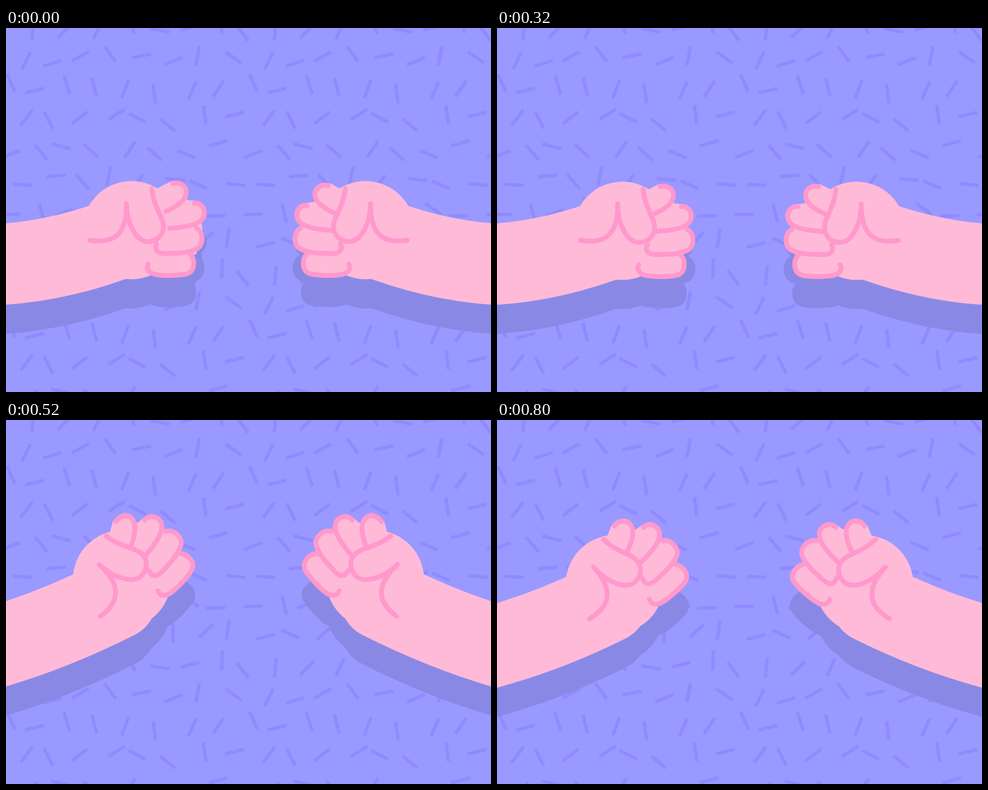
An HTML page with a canvas for the animation above (0.84 s loop, 800x600 px).

```html
<!DOCTYPE html>
<html lang="en">
<head>
<meta charset="utf-8">
<title>Knocking fists</title>
<style>
  html, body { margin: 0; width: 100%; height: 100%; overflow: hidden; background: #9999ff; }
  canvas { display: block; }
</style>
</head>
<body>
<canvas id="stage" width="800" height="600"></canvas>
<script>
const ctx = document.getElementById('stage').getContext('2d');
const LOOP = 840, STEP = 40;
const BACK = '#9999ff', SPRINKLE = '#8f8bff', SHADOW = '#8989e5', SKIN = '#ffbad8', LINE = '#ff99cc';
const WRIST = { x: 117, y: 315 };

const mix = (a, b, k) => a + (b - a) * k;
const easeInOut = u => u < 0.5 ? 4 * u ** 3 : 1 - 4 * (1 - u) ** 3;

let seed = 7;
const random = () => (seed = seed * 16807 % 2147483647) / 2147483647;

// One sprinkle per cell of a staggered 8 by 8 grid, repeated as a tile.
function makeConfetti() {
  const path = new Path2D(), cols = 8, rows = 8, cell = 50, tile = cols * cell;
  for (let i = 0; i < cols * rows; i++) {
    const row = Math.floor(i / cols);
    const cx = (i % cols + row % 2 / 2 + mix(-0.2, 0.2, random())) * cell;
    const cy = (row + mix(-0.2, 0.2, random())) * cell;
    const angle = random() * Math.PI;
    const dx = 16 * Math.cos(angle), dy = 16 * Math.sin(angle);
    for (let x = cx - tile; x < 830; x += tile) {
      for (let y = cy; y < 630; y += tile + 4) {
        path.moveTo(x - dx, y - dy);
        path.lineTo(x + dx, y + dy);
      }
    }
  }
  return path;
}

const confetti = makeConfetti();
const palm = new Path2D();
palm.arc(207, 334, 81, 0, 2 * Math.PI);
const knuckles = new Path2D('M246,268 L267,257 L285,280 L293,289 L306,290 L316,330 L318,350 L306,378 L240,405 Z');
const creases = new Path2D('M138,350 C168,355 200,350 199,290 C199,325 216,354 235,353 ' +
  'C255,352 264,335 258,318 C251,300 243,288 241,266');
const fingers = [
  'M269,261 C279,258 291,264 291,275 C291,288 276,299 257,307',
  'M304,294 C316,292 324,306 319,317 C313,329 293,333 263,335',
  'M314,332 C326,337 327,360 314,366 C298,373 280,373 262,373 C248,373 244,366 248,357',
  'M304,375 C311,382 312,400 300,406 C290,410 262,410 248,408 C235,406 230,398 234,390'
].map(d => new Path2D(d));

// Hand angle in degrees: settle on the table, swing up, start falling, then hit at the loop point.
function handAngle(t) {
  if (t < 240) return mix(-0.5, 2, Math.sin(t / 240 * Math.PI / 2));
  if (t < 630) return mix(2, -51.3, easeInOut((t - 240) / 390));
  return -51.3 + 10.5 * ((t - 630) / 170) ** 2;
}

// The upper two fingers reach outwards on impact.
function eachFinger(reach, paint) {
  fingers.forEach((finger, i) => {
    const out = i < 2 ? reach : 0;
    ctx.save();
    ctx.translate(out, -out / 2);
    paint(finger);
    ctx.restore();
  });
}

function drawArm(angle, reach, skin, line) {
  const bend = -angle / 50;
  const pull = -6 * Math.max(0, Math.sin(Math.PI * bend));
  ctx.fillStyle = ctx.strokeStyle = skin;
  ctx.lineWidth = 134;
  ctx.beginPath();
  ctx.moveTo(-60, mix(390, 386, bend));
  ctx.quadraticCurveTo(mix(65, 60, bend), mix(395, 353, bend), mix(200, 182, bend) + pull, mix(342, 291, bend));
  ctx.stroke();

  ctx.save();
  ctx.translate(WRIST.x + pull, WRIST.y);
  ctx.rotate(angle * Math.PI / 180);
  ctx.translate(-WRIST.x, -WRIST.y);
  ctx.fill(palm);
  eachFinger(reach, finger => {
    ctx.fill(knuckles);
    ctx.fill(finger);
  });
  ctx.lineWidth = 8;
  ctx.strokeStyle = line;
  eachFinger(reach, finger => ctx.stroke(finger));
  ctx.stroke(creases);
  ctx.restore();
}

function drawSide(angle, reach) {
  ctx.save();
  ctx.translate(0, 48);
  drawArm(angle, reach, SHADOW, SHADOW);
  ctx.restore();
  drawArm(angle, reach, SKIN, LINE);
}

function draw(now) {
  const t = Math.floor(now % LOOP / STEP) * STEP;
  const angle = handAngle(t);
  ctx.fillStyle = BACK;
  ctx.fillRect(0, 0, 800, 600);
  ctx.lineCap = 'butt';
  ctx.lineWidth = 5.5;
  ctx.strokeStyle = SPRINKLE;
  ctx.stroke(confetti);

  ctx.lineCap = ctx.lineJoin = 'round';
  drawSide(angle, 7 * Math.exp(-t / 60));
  ctx.save();
  ctx.translate(800, 0);
  ctx.scale(-1, 1);
  drawSide(angle, 0);
  ctx.restore();
  requestAnimationFrame(draw);
}
requestAnimationFrame(draw);
</script>
</body>
</html>
```
